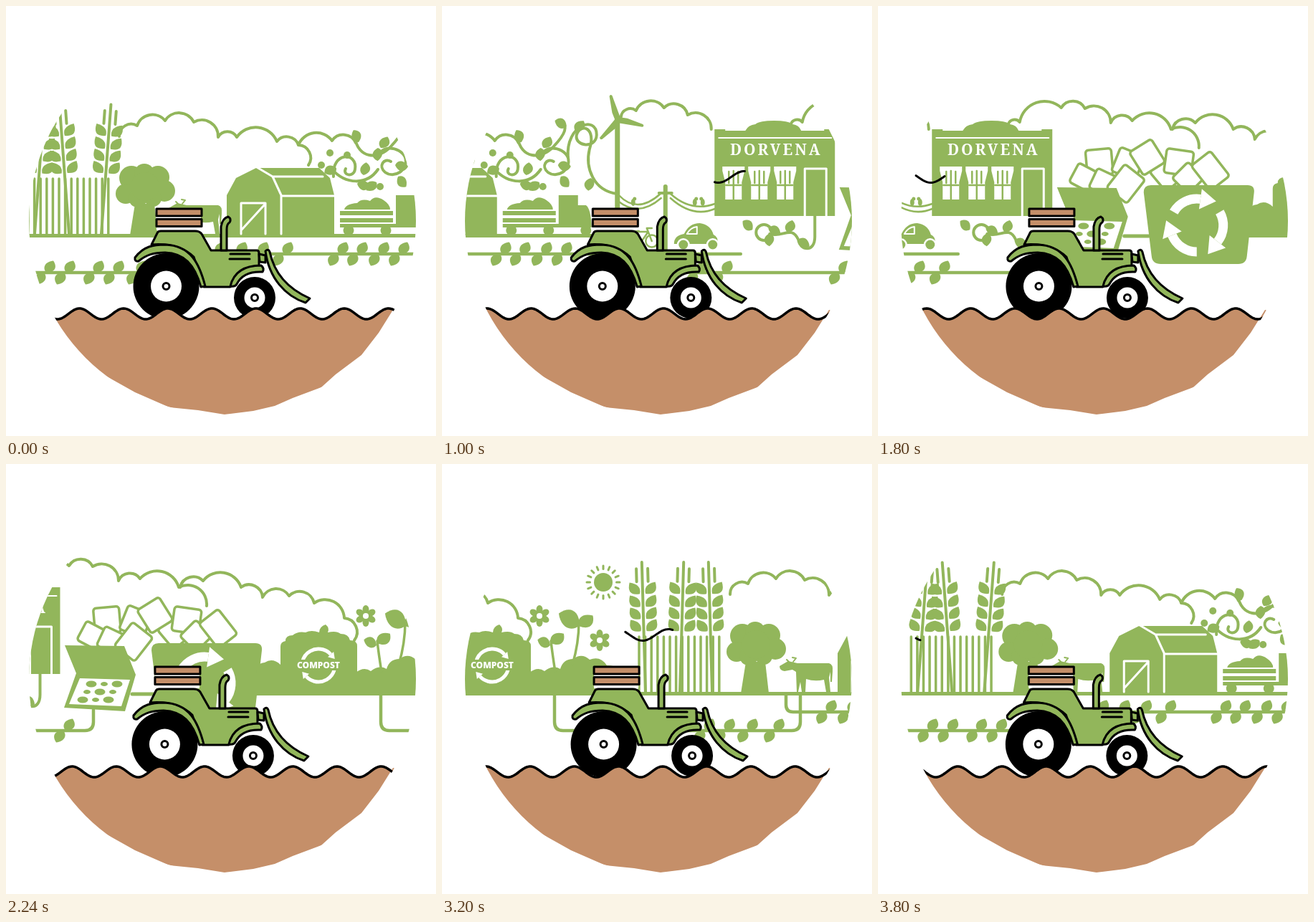
An HTML page with a canvas that plays this animation: 600 px wide and 600 px high, repeating every 3840 ms.

```html
<!DOCTYPE html>
<html lang="en">
<head>
<meta charset="utf-8">
<title>Tractor ride</title>
<style>
html, body { margin: 0; width: 100%; height: 100%; overflow: hidden; background: #fff; }
canvas { display: block; width: 600px; height: 600px; }
</style>
</head>
<body>
<canvas id="stage" width="600" height="600"></canvas>
<script>
const ctx = document.getElementById('stage').getContext('2d');
const GREEN = '#92b65b', SOIL = '#c58f69', WHITE = '#fff', BLACK = '#000';
const LOOP = 3840, HALF = LOOP / 2, STEP = 40, WORLD = 1464, TAU = Math.PI * 2;
const rad = deg => deg * Math.PI / 180;
const clamp = (v, lo, hi) => Math.min(hi, Math.max(lo, v));

ctx.lineCap = ctx.lineJoin = 'round';

function fill(d, color = GREEN) {
  ctx.fillStyle = color;
  ctx.fill(new Path2D(d));
}
function line(d, width = 4, color = GREEN) {
  ctx.lineWidth = width;
  ctx.strokeStyle = color;
  ctx.stroke(new Path2D(d));
}
function dot(x, y, r, color = GREEN, ry = r) {
  ctx.fillStyle = color;
  ctx.beginPath();
  ctx.ellipse(x, y, r, ry, 0, 0, TAU);
  ctx.fill();
}
function ring(x, y, r, width, color = GREEN) {
  ctx.lineWidth = width;
  ctx.strokeStyle = color;
  ctx.beginPath();
  ctx.arc(x, y, r, 0, TAU);
  ctx.stroke();
}
function box(x, y, w, h, color = GREEN) {
  ctx.fillStyle = color;
  ctx.fillRect(x, y, w, h);
}
function at(x, y, angle, draw) {
  ctx.save();
  ctx.translate(x, y);
  ctx.rotate(angle);
  draw();
  ctx.restore();
}
const shift = (x, draw) => at(x, 0, 0, draw);

function leaf(x, y, size, deg) {
  at(x, y, rad(deg), () => {
    ctx.scale(size, size);
    fill('M0 0C.1 -.5 .6 -.55 1 -.15C.85 .4 .4 .5 0 0Z');
  });
}
function sprig(x, y) {
  leaf(x, y, 19, -50);
  leaf(x - 3, y, 19, 130);
}
// Scalloped outline through the cusps of a cloud.
function cloud(...p) {
  let d = `M${p[0]} ${p[1]}`;
  for (let i = 2; i < p.length; i += 2) {
    const r = Math.hypot(p[i] - p[i - 2], p[i + 1] - p[i - 1]) * .57;
    d += `A${r} ${r} 0 0 1 ${p[i]} ${p[i + 1]}`;
  }
  line(d);
}
function arrow(cx, cy, r, from, to, width) {
  const end = rad(to);
  ctx.save();
  ctx.lineCap = 'butt';
  ctx.lineWidth = width;
  ctx.strokeStyle = WHITE;
  ctx.beginPath();
  ctx.arc(cx, cy, r, rad(from), end);
  ctx.stroke();
  ctx.restore();
  at(cx + r * Math.cos(end), cy + r * Math.sin(end), end, () =>
    fill(`M${-width * 1.1} 0H${width * 1.1}L0 ${width * 1.7}Z`, WHITE));
}

function wheat(x, angle) {
  at(x, 318, angle, () => {
    line('M0 0V-181M-8 -172V-154M8 -172V-154', 4);
    for (const side of [-1, 1]) {
      ctx.save();
      ctx.scale(side, 1);
      for (const y of [-137, -119, -102, -85]) fill(`M4 ${y}q-3 -13 14 -16q5 19 -14 16Z`);
      ctx.restore();
    }
  });
}
function field(t) {
  const sway = .075 * Math.cos(TAU * (t - 2840) / HALF);
  for (let i = 0; i < 14; i++) line(`M${31 + i * 8.6} 241V319`, 3.5);
  wheat(40, -sway);
  wheat(88, sway);
  wheat(133, -sway);
}
function treeAndCow() {
  fill('M424 276L417 320H456L451 276Z');
  for (const [x, y, r] of [[419, 240, 17], [437, 234, 14], [456, 239, 16], [411, 262, 14],
    [465, 258, 15], [428, 268, 13], [449, 268, 12], [438, 252, 20]]) dot(x, y, r);
  fill('M471 282L483 275L496 278H540Q546 279 545 290L544 304H542V290L540 298L542 318H536L533 301Q520 304 508 300L507 318H502L500 304L497 318H495L494 290L489 287L478 289Q471 288 471 282Z');
  line('M484 276L481 273M490 276L494 271L489 270', 2);
}
function barn() {
  fill('M308 264L321 240L349 226H437L452 240L458 264V320H308Z');
  line('M350 225L372 238L384 264V318M372 238H442M385 265H458', 3, WHITE);
  line('M328 318V275H362V318M329 312L361 277', 3, WHITE);
}
function truck() {
  fill('M472 284Q474 276 490 275Q496 268 508 272Q515 263 527 271Q536 277 536 284Z');
  fill('M466 286H540V292H466ZM466 296H540V302H466ZM466 304H544V309H466ZM544 264H571V278H582Q589 282 590 309H544Z');
  for (const x of [478, 530, 582]) dot(x, 313, 7.5);
}
function vine() {
  line('M228 238C225 203 262 203 258 228C256 240 240 236 245 227');
  line('M258 184C262 212 290 216 308 196C325 178 328 168 319 160');
  line('M290 213C292 193 320 195 328 211C333 230 312 241 300 232C290 224 298 211 308 217');
  line('M225 227C245 250 275 250 290 228M328 211C325 165 368 152 368 180C367 200 337 196 340 180C346 162 368 170 358 200C352 225 363 258 397 262');
  for (const [x, y, a] of [[326, 168, 215], [338, 174, -40], [263, 190, -105], [294, 198, -50],
    [314, 222, 15], [232, 226, 165], [270, 236, -70], [261, 248, 20], [318, 238, 60],
    [360, 240, 110], [288, 246, 150], [290, 198, 100]]) leaf(x, y, 18, a);
  for (const [x, y] of [[211, 222], [223, 205], [247, 208], [293, 252]]) dot(x, y, 5);
}
function turbine(t) {
  line('M397 158V346', 7);
  for (let i = 0; i < 3; i++) {
    at(398, 159, rad(i * 120 - 12 + (t - 600) * 240 / LOOP), () =>
      fill('M0 -4L12 -5L35 -2Q38 0 35 2L0 4Z'));
  }
  dot(398, 159, 5);
}
function street() {
  line('M464 252V346', 6);
  line('M455 261H473', 4);
  line('M399 264Q425 291 457 262M399 273Q427 295 458 268M471 262Q500 288 533 276M471 268Q502 296 533 283', 2.5);
  for (const [x, dir] of [[419, 1], [505, 1], [516, -1]]) {
    dot(x, 274, 3, GREEN, 5);
    dot(x + dir * 2, 269, 2.5);
  }
  ring(416, 329, 9, 2.5);
  ring(445, 328, 8.5, 2.5);
  line('M416 329L424 315H440L431 328H416M421 318L431 328M445 328L438 310H445M420 314H427', 2.5);
  fill('M476 332Q476 320 490 318Q497 303 512 303Q527 305 531 319Q538 322 537 332Z');
  line('M494 318Q499 309 508 308V318Z', 2, WHITE);
  for (const x of [489, 530]) {
    dot(x, 333, 9, WHITE);
    dot(x, 333, 6.5);
  }
}
function diner() {
  fill('M243 172H258V174H286Q290 166 300 165Q306 160 326 160Q346 160 352 165Q361 166 364 174H396V172H411V293H243Z');
  line('M249 184H406', 2, WHITE);
  ctx.fillStyle = WHITE;
  ctx.font = '900 21px "Noto Serif", serif';
  ctx.textAlign = 'center';
  ctx.textBaseline = 'alphabetic';
  ctx.letterSpacing = '3px';
  ctx.fillText('DORVENA', 329, 208);
  ctx.letterSpacing = '0px';
  for (const x of [254, 290, 326]) {
    fill(`M${x} 224H${x + 31}V230L${x + 27} 246V270H${x + 4}V246L${x} 230Z`, WHITE);
    line(`M${x + 15.5} 230V270M${x + 9} 231V247M${x + 22} 231V247M${x + 5} 250H${x + 26}`, 2.5);
  }
  line('M369 293V227H399V293', 3, WHITE);
  line('M383 293V322C383 345 362 341 360 326C350 305 338 324 320 318');
  ring(312, 316, 11, 4);
  for (const [x, y, a] of [[335, 317, 210], [345, 316, -60], [360, 326, 40], [320, 317, 100], [296, 312, -130]]) leaf(x, y, 18, a);
}
function page(x, y, w, h, deg) {
  at(x, y, rad(deg), () => {
    ctx.beginPath();
    ctx.roundRect(-w / 2, -h / 2, w, h, 4);
    ctx.fillStyle = WHITE;
    ctx.fill();
    ctx.lineWidth = 3.5;
    ctx.strokeStyle = GREEN;
    ctx.stroke();
  });
}
function pizzaBox() {
  line('M176 321H210', 5);
  for (const p of [[235, 235, 36, 32, 50], [141, 218, 36, 36, -5], [252, 218, 38, 34, 8], [181, 220, 36, 36, 22],
    [208, 211, 36, 38, -32], [265, 240, 32, 32, 45], [296, 230, 34, 44, -38], [119, 239, 30, 30, 28],
    [146, 246, 30, 30, 25], [178, 248, 36, 42, 38]]) page(...p);
  fill('M82 253L165 254L181 294L166 345L81 340L98 292Z');
  fill('M103 299L173 301L161 338L88 335Z', WHITE);
  for (let row = 0; row < 3; row++) {
    for (let col = 0; col < 3; col++) {
      const odd = (row + col) % 2;
      dot(117 + col * 18 - row * 6 + 2, 307 + row * 11, odd ? 5 : 7.5, GREEN, odd ? 3 : 4.5);
    }
  }
}
function recycling() {
  fill('M213 250H348Q358 250 357 260L347 349Q346 360 335 360H227Q215 360 214 349L203 260Q203 250 213 250Z');
  for (const a of [-150, -30, 90]) arrow(277, 306, 37, a, a + 68, 13);
}
function compost() {
  fill('M349 323V292Q349 278 361 277Q372 270 383 280V255Q383 248 390 247Q390 239 400 239Q407 233 418 235Q426 231 437 235Q437 227 446 224Q452 229 449 235Q461 232 467 237Q478 237 480 246Q490 246 490 254V323Z');
  arrow(436, 281, 23, 195, 318, 5);
  arrow(436, 281, 23, 15, 138, 5);
  box(405, 273, 62, 15);
  ctx.fillStyle = WHITE;
  ctx.font = '800 12px "Open Sans", sans-serif';
  ctx.textAlign = 'center';
  ctx.textBaseline = 'alphabetic';
  ctx.fillText('COMPOST', 436, 285);
}
function flower(x, y) {
  for (let a = 0; a < 360; a += 60) {
    at(x, y, rad(a + 30), () => dot(9, 0, 6, GREEN, 4.5));
  }
  dot(x, y, 7);
  dot(x, y, 4, WHITE);
}
function garden() {
  fill('M258 323V292Q270 282 280 289Q292 280 302 286Q306 272 320 272Q332 263 343 273Q358 267 367 281Q384 280 386 297V323Z');
  line('M319 280Q328 250 328 220M295 290Q291 265 289 247', 3.5);
  leaf(329, 225, 33, 218);
  leaf(328, 226, 24, -28);
  leaf(288, 253, 19, 212);
  leaf(289, 250, 22, -28);
  flower(273, 212);
  flower(357, 246);
  dot(362, 165, 13);
  for (let a = 0; a < 360; a += 22.5) at(362, 165, rad(a), () => line('M18.5 0H23', 3));
}
function roots() {
  line('M-87 323V360Q-87 372 -75 372H244Q256 372 256 360V323', 4.5);
  line('M236 323V336Q236 346 246 346H798', 4.5);
  line('M716 346V360Q716 372 728 372H964Q976 372 976 360V343', 4.5);
  for (const x of [56, 84, 124, 152, 184, 221, 739, 774, 937]) sprig(x, 372);
  for (const x of [294, 324, 354, 388, 465, 492, 522, 550]) sprig(x, 346);
}
function landscape(t) {
  cloud(158, 182, 183, 167, 222, 160, 262, 162, 296, 183, 322, 183, 378, 189, 408, 194, 422, 222);
  cloud(408, 194, 455, 188, 488, 191);
  cloud(631, 155, 652, 146, 691, 142, 724, 152, 757, 172);
  cloud(868, 165, 884, 162, 942, 142, 975, 143, 1011, 163, 1041, 160, 1095, 172, 1134, 198);
  cloud(1097, 172, 1129, 163, 1182, 172, 1212, 186, 1249, 184, 1284, 194, 1326, 215, 1340, 246);
  box(-8, 318, 634, 5);
  roots();
  field(t);
  shift(-244, treeAndCow);
  barn();
  truck();
  shift(229, () => { vine(); turbine(t); street(); });
  shift(518.5, diner);
  shift(854, () => { pizzaBox(); recycling(); compost(); });
  shift(1083, garden);
}

function wind(head, tail, height) {
  if (tail - head < 1) return;
  let d = '';
  for (let x = head; x <= tail; x += 2) d += `${d ? 'L' : 'M'}${x} ${height(x)}`;
  line(d, 3, BLACK);
}
function gusts(t) {
  const c = t % HALF;
  const fade = clamp((c - 600) / 320, 0, 1);
  wind(clamp(418 - .425 * (c - 600), 323, 486), clamp(354 - .4125 * (c - 920), 323, 486),
    x => 155.5 + 11.5 * fade + (8 - 6.5 * fade) * Math.cos(TAU * (x - 465) / 88));
  const trough = 280 - .12 * (c - 1280);
  wind(clamp(416 - .445 * (c - 920), 53, 423), clamp(288 - .44 * (c - 1360), 53, 423),
    x => 238.5 + 8 * Math.cos(TAU * (x - trough) / 72));
}

function wheel(x, y, r, inner) {
  dot(x, y, r, BLACK);
  dot(x, y, inner, WHITE);
  ring(x, y, 4.5, 3, BLACK);
}
function part(d, color = GREEN) {
  fill(d, color);
  line(d, 3, BLACK);
}
function tractor() {
  wheel(223.5, 391, 46, 21.5);
  wheel(347, 407, 29, 14.5);
  box(210, 284, 62, 29, WHITE);
  part('M210 283H273V293H210Z', SOIL);
  part('M210 297.5H273V307.5H210Z', SOIL);
  part('M203 333L211 317Q212 314 216 314H264Q270 314 273 318L286 341H350Q353 341 353 345V363Q325 364 315 390L313 392H276L262 350Q240 330 203 333Z');
  part('M180 351C192 335 206 333 222 333C258 334 270 360 278 391L272 392C263 360 248 345 222 344C206 344 196 347 185 356Q179 357 180 351Z');
  part('M313 391C318 370 335 362 356 362Q361 366 358 371C340 370 328 376 322 388Q320 392 313 391Z');
  part('M353 346L362 348V358L354 357Z');
  part('M362 342Q366 338 368 343C374 372 392 394 424 408L418 414C390 405 367 380 362 342Z');
  part('M300 341V308Q302 296 310 294Q315 297 312 302Q308 304 308 312V341Z');
  line('M313 346H340M312 353H340', 3, BLACK);
}
function soil(t) {
  const period = 61.6, crest = 102.5 - t * 14 * period / LOOP;
  let top = '';
  for (let x = 30; x <= 574; x += 2) {
    top += `${top ? 'L' : 'M'}${x} ${429.5 - 7.5 * Math.cos(TAU * (x - crest) / period)}`;
  }
  fill(top + 'L540 424L520 456L496 487L460 514L440 532L400 547L375 558L345 565L305 570L268 564L228 560L180 539L130 511L108 490L84 462L58 422Z', SOIL);
  line(top, 3.5, BLACK);
}

function draw(t) {
  box(0, 0, 600, 600, WHITE);
  ctx.save();
  ctx.beginPath();
  ctx.arc(302, 300, 270, 0, TAU);
  ctx.clip();
  const scroll = t / LOOP * WORLD;
  for (let k = -1; k <= 1; k++) shift(k * WORLD - scroll, () => landscape(t));
  gusts(t);
  shift(-2.4 * Math.sin(TAU * t / HALF), tractor);
  soil(t);
  ctx.restore();
}
function tick() {
  draw(Math.floor(performance.now() / STEP + .001) * STEP % LOOP);
  requestAnimationFrame(tick);
}
tick();
</script>
</body>
</html>
```
